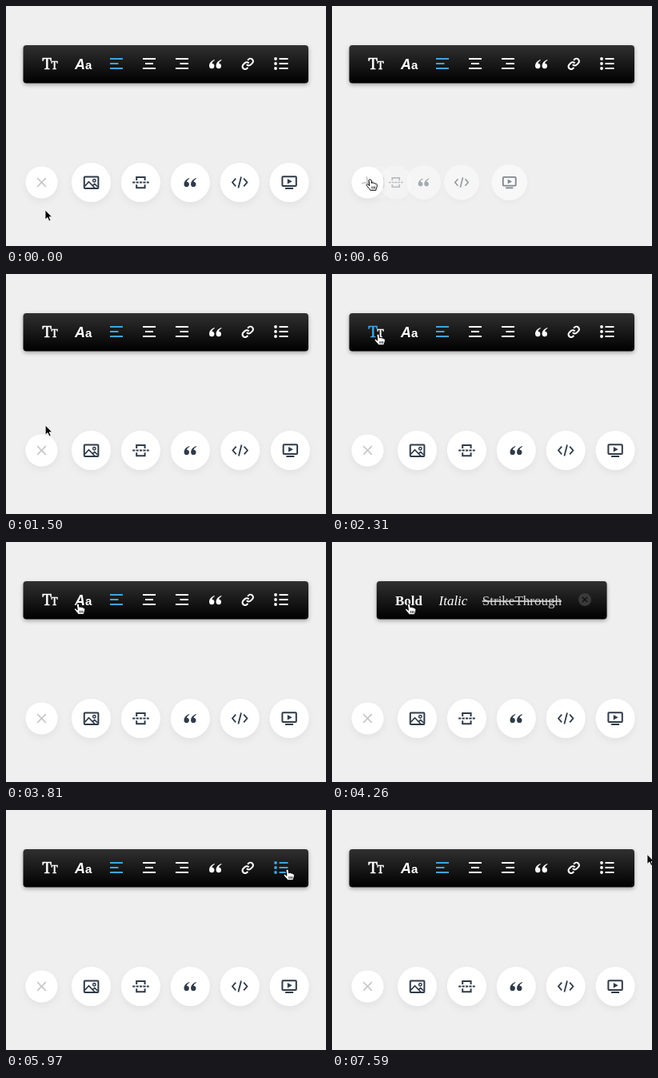
An HTML page for the animation above (7.62 s loop, 400 by 300 pixels).

```html
<!DOCTYPE html>
<html lang="en">
<head>
<meta charset="utf-8">
<title>Editor toolbar</title>
<style>
  html, body { margin: 0; width: 100%; height: 100%; overflow: hidden; background: #efefef; }
  svg { display: block; width: 400px; height: 300px; }
  .bar { filter: drop-shadow(0 2px 2.5px rgba(0, 0, 0, .32)); }
  .disc { fill: #fff; filter: drop-shadow(0 4px 4px rgba(0, 0, 0, .05)); }
  .line { fill: none; stroke: currentColor; stroke-width: 2; }
  .fill { fill: currentColor; }
  .slab { font-family: "Noto Serif", serif; fill: currentColor; stroke: currentColor; stroke-width: .5; }
  .sans { font: bold 15px "Liberation Sans", Arial, sans-serif; fill: currentColor; }
  .times { font: 17px "Liberation Serif", "Times New Roman", serif; fill: currentColor; }
  #main, #styles { color: #fff; }
  .item { color: #303b49; }
</style>
</head>
<body>
<svg viewBox="0 0 400 300">
  <defs>
    <linearGradient id="dark" x2="0" y2="1">
      <stop stop-color="#303030"/>
      <stop offset="1" stop-color="#000"/>
    </linearGradient>
    <path id="mark" d="M6.4 0C2.5 1.5 0 4.5 0 8a3.2 3.2 0 1 0 3.4-3.2C3.6 3.3 4.8 2 6.9 1z"/>
    <g id="quotes"><use href="#mark"/><use href="#mark" x="8.6"/></g>
  </defs>

  <rect id="bar" class="bar" y="49" height="47.5" rx="4" fill="url(#dark)"/>

  <g id="main">
    <text id="bigT" class="slab" x="45.3" y="79" font-size="19.5">T</text>
    <text id="smallT" class="slab" x="56.6" y="79" font-size="13.5">T</text>
    <text class="sans" x="86" y="79" style="font-size:18px;font-style:italic">A</text>
    <text class="sans" x="99" y="79">a</text>
    <path class="line" style="color:#3fa4e0" d="M130 66h16M130 72h10.5M130 78h16"/>
    <path class="line" d="M171 66h16M174 72h10M171 78h16"/>
    <path class="line" d="M212 66h16M217.5 72h10.5M212 78h16"/>
    <use href="#quotes" class="fill" x="254" y="67"/>
    <g class="line" transform="translate(294.2 64.3) scale(.67)" style="stroke-width:3.1">
      <path d="M10 13a5 5 0 0 0 7.54.54l3-3a5 5 0 0 0-7.07-7.07l-1.72 1.71"/>
      <path d="M14 11a5 5 0 0 0-7.54-.54l-3 3a5 5 0 0 0 7.07 7.07l1.71-1.71"/>
    </g>
    <g id="list">
      <path class="line" d="M341.5 66h11M341.5 72h11M341.5 78h11"/>
      <path id="dots" class="line" style="stroke-width:3.8;stroke-linecap:round" d="M337 66h.01M337 72h.01M337 78h.01"/>
      <g id="digits" class="sans" style="font-size:7px">
        <text x="335" y="68.5">1</text><text x="335" y="74.5">2</text><text x="335" y="80.5">3</text>
      </g>
    </g>
  </g>

  <g id="styles">
    <text class="times" x="79" y="79" font-weight="bold" style="font-weight:bold">Bold</text>
    <text class="times" x="133.5" y="79" style="font-style:italic">Italic</text>
    <text class="times" x="187.8" y="79" style="color:#d5d5d5;text-decoration:line-through">StrikeThrough</text>
    <circle cx="316" cy="72" r="8" fill="#3a3a3a"/>
    <path class="line" style="color:#111;stroke-width:1.5" d="M313 69l6 6m0-6l-6 6"/>
  </g>

  <g class="item"><circle class="disc" r="24.5"/>
    <rect class="line" x="-8.7" y="-7" width="17.6" height="14.4" rx="1"/>
    <path class="line" style="stroke-width:1.7" d="M-8 4.8L-3 -.8L4.5 7M1.8 4L4.3 2L8 5.5"/>
    <circle class="line" style="stroke-width:1.5" cx="3.8" cy="-2.2" r="1.7"/>
  </g>
  <g class="item"><circle class="disc" r="24.5"/>
    <path class="line" d="M-5.2 -2.6V-6.5H5.2V-2.6M-5.2 2.8V6.7H5.2V2.8"/>
    <path class="line" style="stroke-width:1.8" stroke-dasharray="3.2 1.2" d="M-10.2 0H10.4"/>
  </g>
  <g class="item"><circle class="disc" r="24.5"/>
    <use href="#quotes" class="fill" x="-7.8" y="-5.6"/>
  </g>
  <g class="item"><circle class="disc" r="24.5"/>
    <path class="line" style="stroke-width:1.8" d="M-5 -4.8L-9.2 0L-5 4.8M5 -4.8L9.2 0L5 4.8M1.8 -7L-1.8 7"/>
  </g>
  <g class="item"><circle class="disc" r="24.5"/>
    <rect class="line" x="-8.7" y="-7.2" width="17.4" height="11.8" rx="1"/>
    <path class="fill" d="M-2.3 -4.4L3.6 -1.2L-2.3 2z"/>
    <path class="line" d="M-5 7.5H5"/>
  </g>

  <circle class="disc" cx="44.5" cy="220.5" r="20"/>
  <path id="cross" class="line" style="color:#c8c8c8;stroke-width:1.7" d="M-5.3 -5.3L5.3 5.3M5.3 -5.3L-5.3 5.3"/>

  <path id="arrow" fill="#000" stroke="#fff" stroke-width=".8" d="M0 0V12L2.9 9.4L4.9 13.9L6.9 13L5 8.7H8.6z"/>
  <g id="hand" fill="#fff" stroke="#000" stroke-linejoin="round">
    <path d="M-1.5 1.6C-1.5 -.1 1.1 -.3 1.5 1.4L2.2 5C3 4 4.6 4.2 4.8 5.2C5.8 4.6 7 5 7.1 6C8.2 5.6 9 6.4 8.9 7.6C8.9 10 7.8 11 7.4 13.8H.4C-.5 11.5 -3 10 -4.2 7.8C-4.8 6.4 -3 5.6 -2 7L-.6 8.3z"/>
    <path stroke-width=".8" d="M2.4 9v3M4.3 9v3M6.1 9v3"/>
  </g>
</svg>
<script>
const LOOP = 7620, STEP = 30, BLUE = '#3fa4e0';
const $ = id => document.getElementById(id);
const items = [...document.querySelectorAll('.item')];
const clamp = v => Math.min(1, Math.max(0, v));
const smooth = u => u * u * (3 - 2 * u);
const easeOut = u => u * (2 - u);
const span = (t, a, b) => clamp((t - a) / (b - a));
const within = (t, a, b) => t >= a && t < b;
const place = (el, x, y, more = '') => el.setAttribute('transform', `translate(${x} ${y}) ${more}`);

// Pointer legs: start, end, x, y, sag, easing
const legs = [
  [15, 360, 47.5, 216.5],
  [1328, 1928, 56, 79],
  [1930, 2070, 57.5, 75],
  [3585, 3960, 96, 77, 0, easeOut],
  [4395, 5100, 317.5, 77, 11],
  [5535, 5730, 351.5, 74],
  [6345, 6480, 352.5, 74],
  [7535, 7590, 394, 55.5]
];

function pointer(t) {
  let x = 49, y = 255;
  for (const [a, b, tx, ty, sag = 0, ease = smooth] of legs) {
    const u = ease(span(t, a, b));
    x += (tx - x) * u;
    y += (ty - y) * u + sag * Math.sin(Math.PI * u);
    if (t < b) break;
  }
  return [x, y];
}

// 1 = spread out, 0 = tucked behind the close button
function spread(t, i) {
  const delay = 13.8 * i;
  if (t < 1035) return (1 + Math.cos(Math.PI * span(t - delay, 505, 725))) / 2;
  const v = span(t - delay, 1035, 1485) - 1;
  return 1 + 1.67 * v ** 3 + .67 * v ** 2;
}

function draw(t) {
  items.forEach((el, i) => {
    const p = spread(t, i);
    place(el, 44.5 + (62 + 61.9 * i) * p, 220.5, `scale(${.8 + .2 * Math.min(1, p)})`);
    el.style.opacity = clamp(p);
  });
  place($('cross'), 44.5, 220.5, `rotate(${45 * (1 - spread(t, 0))})`);

  const k = smooth(span(t, 4085, 4260)) - smooth(span(t, 5255, 5400));
  const left = 21.5 + 34.3 * k, right = 378 - 34.4 * k;
  $('bar').setAttribute('x', left);
  $('bar').setAttribute('width', right - left);
  $('main').style.opacity = clamp(1 - 2 * k);
  $('styles').style.opacity = clamp(2 * k - 1);

  const tint = (id, on) => $(id).style.color = on ? BLUE : '';
  const show = (id, on) => $(id).style.display = on ? '' : 'none';
  const numbered = within(t, 6360, 6720);
  tint('bigT', within(t, 2310, 2730));
  tint('smallT', within(t, 2730, 3300));
  tint('list', within(t, 5970, 6720));
  show('dots', !numbered);
  show('digits', numbered);

  const [x, y] = pointer(t);
  const hot = Math.hypot(x - 44.5, y - 220.5) < 20 || (x > left && x < right && y > 49 && y < 97);
  show('hand', hot);
  show('arrow', !hot);
  place($(hot ? 'hand' : 'arrow'), x, y);
}

const start = performance.now();
function tick() {
  const t = (performance.now() - start) % LOOP;
  draw(Math.floor(t / STEP) * STEP);
  requestAnimationFrame(tick);
}
tick();
</script>
</body>
</html>
```
